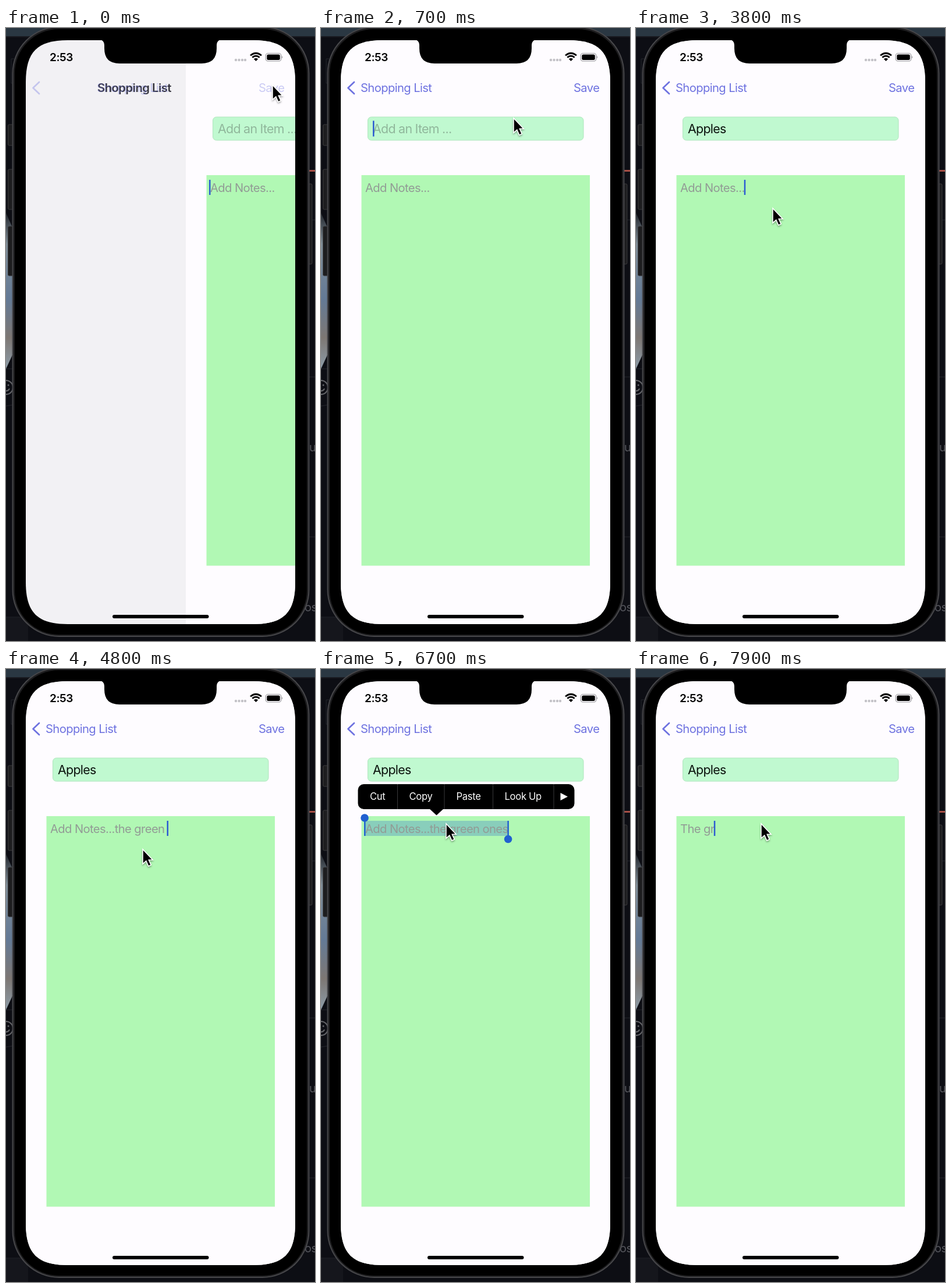
An HTML page that plays this animation: 531x1054 px, repeating every 8000 ms.

```html
<!DOCTYPE html>
<html lang="en">
<head>
<meta charset="utf-8">
<title>Shopping list</title>
<style>
  html, body { margin: 0; height: 100%; overflow: hidden; background: #0d0e14; }
  svg { display: block; width: 531px; height: 1054px; }
  text { font: 20.2px Inter, sans-serif; letter-spacing: -.6px; white-space: pre; }
  .nav { fill: #6e72e0; }
  .title { font-weight: 600; letter-spacing: -.48px; fill: #1c1c26; }
  .field { font-size: 21.4px; letter-spacing: -.72px; }
  .clock { font-size: 19px; font-weight: 600; letter-spacing: -.4px; }
  .menu text { font-size: 16.6px; letter-spacing: -.3px; fill: #fff; }
  .caret { fill: #2c5bd2; }
  .backdrop text { fill: #55565c; }
</style>
</head>
<body>
<svg viewBox="0 0 531 1054">
  <defs>
    <clipPath id="screen">
      <path d="M34 93C34 41 54 21 106 21H425C477 21 497 41 497 93V953C497 1005 477 1025 425 1025H106C54 1025 34 1005 34 953Z"/>
    </clipPath>
    <linearGradient id="photo" x2="0" y2="1">
      <stop offset="0" stop-color="#23272d"/>
      <stop offset=".2" stop-color="#7f8c96"/>
      <stop offset=".55" stop-color="#647a96"/>
      <stop offset=".8" stop-color="#7d7773"/>
      <stop offset="1" stop-color="#8c9ba7"/>
    </linearGradient>
    <filter id="shadow" x="-50%" y="-50%" width="200%" height="200%">
      <feDropShadow dx="0" dy="2" stdDeviation="1.5" flood-opacity=".35"/>
    </filter>
  </defs>

  <g class="backdrop">
    <rect width="531" height="1054" fill="#0d0e14"/>
    <rect width="531" height="14" fill="#2a3742"/>
    <path d="M0 15H531M14 53H9V95H14M0 650L12 648M0 586H12M0 1013H40M520 330H531M520 600H531M520 875H531" stroke="#25262c" fill="none"/>
    <rect y="1014" width="38" height="40" fill="#15161c"/>
    <path d="M0 318L12 345V560L0 586Z" fill="url(#photo)"/>
    <circle cy="618" r="12" fill="none" stroke="#66676b" stroke-width="2"/>
    <circle cx="4" cy="614" r="1.5" fill="#66676b"/>
    <path d="M0 624Q4 624 6 620" fill="none" stroke="#66676b" stroke-width="2"/>
    <path d="M520 245.500H531" stroke="#a84f46" stroke-width="3"/>
    <text x="521" y="728">u</text>
    <text x="513" y="1003">os</text>
  </g>

  <g stroke="#3b3b3d" fill="#1d1d1f">
    <rect x="3.500" y="166" width="9" height="36" rx="2"/>
    <rect x="3.500" y="243" width="9" height="69" rx="2"/>
    <rect x="3.500" y="341" width="9" height="85" rx="2"/>
    <rect x="517" y="268" width="9" height="138" rx="2"/>
    <rect x="11.500" y="-2" width="509" height="1048" rx="80" stroke="#47474a" stroke-width="2"/>
  </g>
  <rect x="15" y="2" width="502" height="1041" rx="76"/>

  <g clip-path="url(#screen)">
    <rect x="34" y="21" width="463" height="1004" fill="#f2f1f4"/>
    <g id="page">
      <rect x="34" y="21" width="463" height="1004" fill="#fefcff"/>
      <rect x="80.500" y="153" width="370.500" height="40" rx="6" fill="#c0f9d0" stroke="#aee5bc"/>
      <text id="item" class="field" x="89" y="180.500"></text>
      <g id="clear">
        <circle cx="432.500" cy="173.500" r="10.800" fill="#92bc9d"/>
        <path d="M428.500 169.500l8 8m0-8l-8 8" stroke="#d3fbdc" stroke-width="1.800" stroke-linecap="round"/>
      </g>
      <rect x="69.500" y="253" width="392.500" height="671.500" fill="#b1f8b4"/>
      <rect id="marked" x="75" y="261" height="26" fill="#1f5fd0" opacity=".27"/>
      <text id="notes" x="76" y="282" fill="#929b95"></text>
      <rect id="caret" class="caret" width="2.500"/>
      <g id="handles" fill="#2160d0">
        <rect x="74" y="256" width="2.500" height="31"/>
        <circle cx="75" cy="256" r="6.800"/>
        <g id="endHandle">
          <rect x="-1.200" y="261" width="2.500" height="31"/>
          <circle cy="292.500" r="6.800"/>
        </g>
      </g>
    </g>

    <text id="title" class="title" y="110">Shopping List</text>
    <text id="back" class="nav" y="110">Shopping List</text>
    <g id="buttons">
      <path d="M57 93L46.500 103L57 113" fill="none" stroke="#6e72e0" stroke-width="2.700" stroke-linecap="round" stroke-linejoin="round"/>
      <text class="nav" x="434" y="110">Save</text>
    </g>

    <g id="menu" class="menu">
      <rect x="63.500" y="198" width="372" height="43" rx="10"/>
      <path d="M186 240H211L198.500 251.500Z"/>
      <path d="M131.500 198V241M212 198V241M295.500 198V241M400 198V241" stroke="#38383a"/>
      <text x="84" y="225">Cut</text>
      <text x="151.500" y="225">Copy</text>
      <text x="232.500" y="225">Paste</text>
      <text x="315.500" y="225">Look Up</text>
      <path d="M411.500 213V226L424 219.500Z" fill="#fff"/>
    </g>

    <path d="M160 20C166 20 169 24 169 30V35Q169 61 195 61H336Q362 61 362 35V30C362 24 365 20 371 20Z"/>
    <text class="clock" x="75" y="57">2:53</text>
    <g fill="#c3c2c7">
      <circle cx="395" cy="55" r="2.200"/><circle cx="400.500" cy="55" r="2.200"/>
      <circle cx="406" cy="55" r="2.200"/><circle cx="411" cy="55" r="2.200"/>
    </g>
    <path d="M429.500 57L425.800 53.200Q429.500 50.200 433.200 53.200Z"/>
    <path d="M423.300 50.600Q429.500 45.400 435.700 50.600M420 47.300Q429.500 39.200 439 47.300" fill="none" stroke="#000" stroke-width="2.700"/>
    <rect x="446.300" y="43.500" width="26.500" height="13.500" rx="4" fill="none" stroke="#98979c" stroke-width="1.200"/>
    <rect x="448.300" y="45.500" width="22.500" height="9.500" rx="2.500"/>
    <path d="M474 48Q476.500 50.200 474 52.500Z" fill="#98979c"/>
    <rect x="183" y="1009" width="165.500" height="6" rx="3"/>
  </g>

  <path id="pointer" d="M0 0V25L5.800 20L9.800 29L14.200 27L10.300 18.300H17.200Z" stroke="#fff" stroke-width="1.500" filter="url(#shadow)"/>
</svg>
<script>
const LOOP = 8000, STEP = 100;
const el = Object.fromEntries([...document.querySelectorAll('svg [id]')].map(n => [n.id, n]));
const clamp = v => Math.min(1, Math.max(0, v));
const ease = v => v * v * (3 - 2 * v);
const set = (node, attrs) => { for (const k in attrs) node.setAttribute(k, attrs[k]); };
const show = (node, on) => set(node, { opacity: on ? 1 : 0 });
const typed = (text, t, start, gap) => text.slice(0, Math.max(0, Math.floor((t - start) / gap) + 1));

// Pointer moves: start, end, x, y
const moves = [[100, 600, 331, 155], [2400, 3300, 235, 310], [5250, 5750, 252, 258], [5900, 6300, 215, 266]];
function pointerAt(t) {
  let x = 458, y = 98;
  for (const [from, to, nx, ny] of moves) {
    const k = ease(clamp((t - from) / (to - from)));
    x += (nx - x) * k;
    y += (ny - y) * k;
  }
  return `translate(${x} ${y})`;
}

function render(t) {
  const slide = t < 600 ? Math.exp(-t / 105) : 0;
  set(el.page, { transform: `translate(${275 * slide} 0)` });
  set(el.title, { x: 68 + 89 * slide, opacity: .88 * slide });
  set(el.back, { x: 68 + 88 * slide, opacity: 1 - .65 * slide });
  set(el.buttons, { opacity: 1 - .65 * slide });

  const item = typed('Apples', t, 1100, 170);
  el.item.textContent = item || 'Add an Item ...';
  set(el.item, { fill: item ? '#0b130d' : '#90b79b' });
  const inField = t >= 650 && t < 3500;
  show(el.clear, inField && item);

  const retyped = t >= 7150;
  el.notes.textContent = retyped
    ? typed('The gr', t, 7200, 130)
    : 'Add Notes...' + typed('the green ones', t, 3900, 100);
  const notesEnd = 76 + el.notes.getComputedTextLength();

  const selected = t >= 6400 && !retyped;
  const caretX = inField ? 89 + (item ? el.item.getComputedTextLength() : 0) : t < 650 ? 74 : notesEnd - 1;
  set(el.caret, { x: caretX, y: inField ? 159.5 : 261, height: inField ? 27 : 26 });
  show(el.caret, !selected);
  show(el.handles, selected);
  set(el.marked, { width: selected ? notesEnd - 75 : 0 });
  set(el.endHandle, { transform: `translate(${notesEnd} 0)` });
  set(el.menu, { opacity: selected ? clamp((t - 6400) / 200) : 0 });
  set(el.pointer, { transform: pointerAt(t) });
}

const start = performance.now();
function tick() {
  const t = (performance.now() - start) % LOOP;
  render(Math.floor(t / STEP) * STEP);
  requestAnimationFrame(tick);
}
tick();
</script>
</body>
</html>
```
